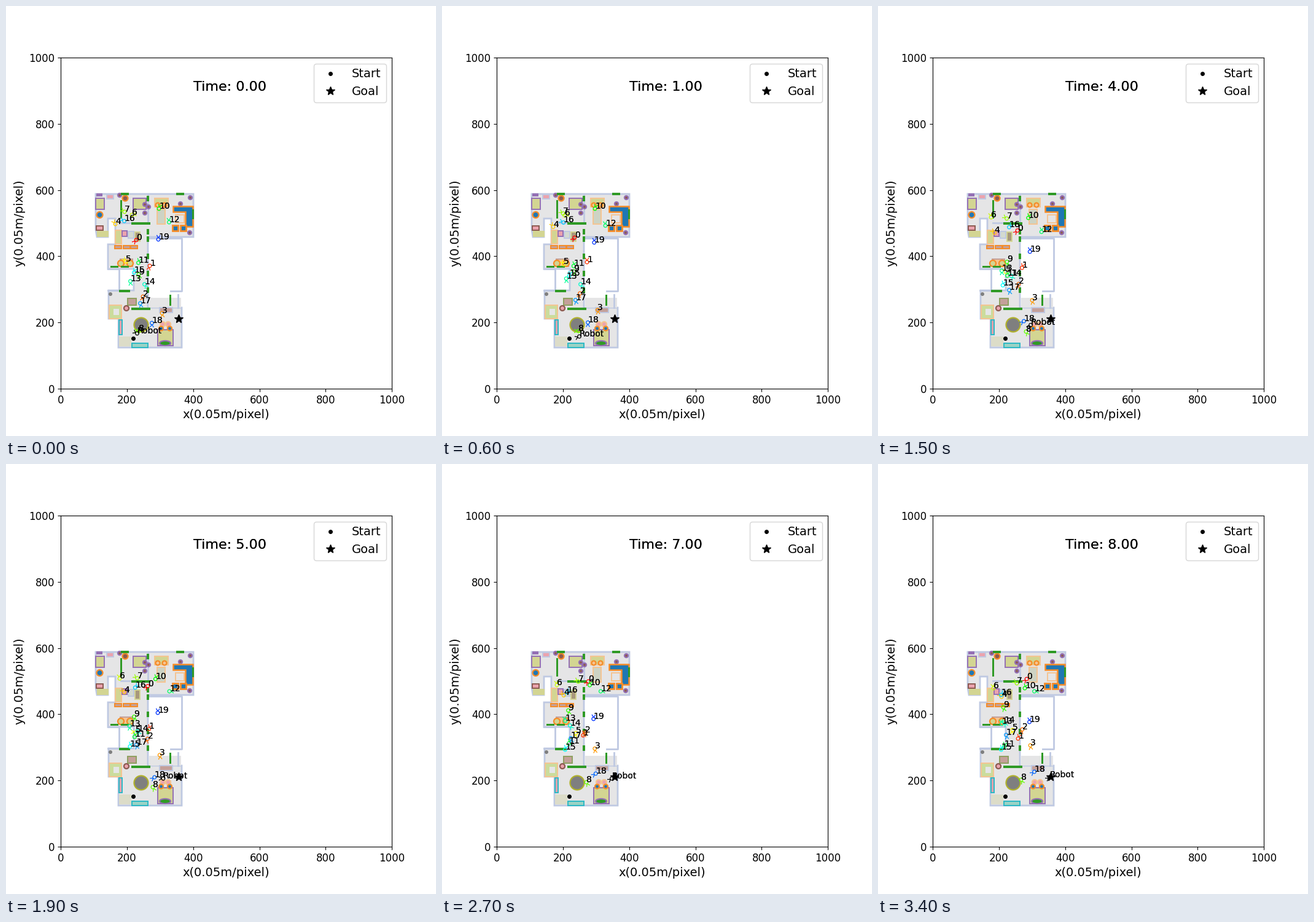
A matplotlib script for the animation above (3500 ms loop, 700 by 700 pixels).

```python
import colorsys
import numpy as np
import matplotlib.pyplot as plt
from matplotlib.animation import FuncAnimation
from matplotlib.patches import Circle, Ellipse, Polygon, Rectangle
from matplotlib.transforms import Affine2D

FRAMES = 35
LAST = 8  # simulated seconds
FLOOR, WALL = "#e5e5e6", "#bfc9e2"
GREEN, OLIVE, GRAY = "#2f9a25", "#d3d592", "#7f7f7f"
ORANGE, PEACH, BLUE, TEAL = "#f58c28", "#f5c491", "#1f77b4", "#2bb9c6"
PURPLE, BROWN, PINK, TAUPE = "#9470b4", "#8c5a50", "#eba3ae", "#c4a09a"

fig = plt.figure(figsize=(7, 7), dpi=100)
ax = fig.add_subplot()
ax.set(xlim=(0, 1000), ylim=(0, 1000))
ax.set_aspect("equal")
ax.tick_params(labelsize=12)
ax.set_xlabel("x(0.05m/pixel)", fontsize=14)
ax.set_ylabel("y(0.05m/pixel)", fontsize=14)

# Stage pixels (y down) to axes data
PX = Affine2D().translate(-89.25, -623).scale(1 / 0.539, -1 / 0.539) + ax.transData


def put(patch):
    patch.set_transform(PX)
    ax.add_artist(patch)
    return patch


def box(x, y, w, h, fill, edge="none", lw=1.4):
    """Rectangle around a centre."""
    put(Rectangle((x - w / 2, y - h / 2), w, h, fc=fill, ec=edge, lw=lw, zorder=1))


def blob(x, y, w, fill, edge="none", h=None):
    put(Ellipse((x, y), w, h or w, fc=fill, ec=edge, lw=1.6, zorder=1))


def wall(*points):
    ax.plot(*zip(*points), color=WALL, lw=2, transform=PX, zorder=1)


def doors(xs, ys, w, h):
    for x in xs:
        for y in ys:
            box(x, y, w, h, GREEN)


def draw_house():
    outline = [(146, 306), (305, 306), (305, 376), (231, 376), (231, 491),
               (286, 491), (286, 556), (183, 556), (183, 509), (167, 509),
               (167, 463), (208, 463), (208, 428), (166, 428), (166, 388),
               (178, 388), (178, 346), (166, 346), (166, 376), (148, 376),
               (146, 364)]
    put(Polygon(outline, fc=FLOOR, ec=WALL, lw=2, zorder=1))
    box(259, 483, 52, 16, FLOOR)
    wall((231, 378), (286, 378), (286, 464), (268, 464))
    wall((166, 428), (184, 428), (184, 463), (166, 463))
    wall((187, 353), (231, 353), (231, 306))
    wall((280, 470), (280, 491))


def draw_living():
    for x in (153, 217):
        box(x, 322, 14 + (x > 200) * 7, 18, OLIVE, PURPLE)
    blob(152.5, 340, 10, BLUE, ORANGE)
    box(152, 361, 11, 7, PINK, BROWN)
    box(157, 371, 19, 10, OLIVE)
    box(152, 307, 10, 5, PURPLE)
    box(169, 310, 11, 7, PINK, WALL)
    blob(194, 313, 9, BROWN, ORANGE)
    for x, y in [(185, 308), (226, 323), (232, 327), (226, 337), (300, 312),
                 (284, 322), (299, 369)]:
        blob(x, y, 6, BROWN, PURPLE)
    box(253, 320, 22, 14, OLIVE, PEACH)
    box(252, 343, 13, 24, "#cdd3c4", PEACH)
    for x in (247, 258):
        blob(x, 324, 7, PEACH, ORANGE)
    sofa = [(272, 326), (304, 326), (304, 359), (292, 359), (292, 335), (272, 335)]
    put(Polygon(sofa, fc=BLUE, ec=ORANGE, lw=1.8, zorder=1))
    box(283, 346, 14, 13, FLOOR, PEACH)
    for x in (275, 288):
        box(x, 361, 9, 9, BLUE, ORANGE, 2)


def draw_kitchen():
    box(183, 376, 10, 22, OLIVE, PEACH)
    box(193, 370, 8, 9, PINK, PURPLE)
    box(203, 372, 9, 11, "#d3dad0", WALL)
    box(214, 375, 8, 15, "#a8987c", OLIVE)
    for x in (182, 196, 208):
        box(x, 392, 11, 5, TAUPE, ORANGE)
    box(196, 418, 20, 12, PEACH, TAUPE)
    for x in (187, 202):
        blob(x, 419, 10, OLIVE, ORANGE)


def draw_bedroom():
    box(178, 498, 20, 22, "#cbdc9c", PEACH)
    box(179, 498, 9, 10, FLOOR)
    box(205, 481, 14, 11, TAUPE, "#8fa060")
    blob(196, 492, 8, PINK, BROWN)
    blob(170, 469, 6, GRAY)
    box(260, 495, 21, 8, TAUPE, WALL)
    box(186.5, 523, 5, 24, PINK, TEAL)
    box(218, 552, 26, 7, "#9ad2c4", TEAL)
    box(194, 546, 20, 16, "#dcdcc8")
    blob(220, 519, 23, GRAY, "#b0b12c")
    box(259.5, 540, 25, 26, OLIVE, PURPLE)
    for side in (-1, 1):
        blob(259.5 + 4.5 * side, 518, 8, PINK, PEACH)
        blob(259.5 + 7 * side, 525, 7, BLUE, ORANGE)
    blob(259, 549, 18, GREEN, PURPLE, h=8)


def draw_doors():
    doors((231,), (313, 367, 379, 407, 435, 462), 4, 9)
    doors((187.5,), (323, 338), 3, 15)
    doors((193, 283), (306,), 13, 4)
    doors((214, 224), (353.5, 493), 21, 4)
    doors((176, 193), (424,), 13, 3)
    doors((193,), (464,), 18, 4)
    doors((267.5,), (479,), 3, 18)
    doors((304.5,), (339,), 3, 16)


class Agent:
    """Ring, heading arrow and label that follow (t, x, y) key points."""

    def __init__(self, name, color, *keys):
        self.t, self.x, self.y = np.array(keys, float).T
        self.ring = put(Circle((0, 0), 2.8, fill=False, ec=color, lw=0.9, zorder=3))
        self.arrow, = ax.plot([], [], color=color, lw=0.9, transform=PX, zorder=3)
        self.label = ax.text(0, 0, name, fontsize=10, transform=PX, zorder=4)
        ax.add_artist(self.label)  # drawn twice for a heavier stroke

    def at(self, t):
        return np.array([np.interp(t, self.t, self.x), np.interp(t, self.t, self.y)])

    def move(self, t):
        a = min(t, LAST - 1)
        step = self.at(a + 1) - self.at(a)
        if not step.any():
            step = self.at(LAST) - self.at(0)
        d = step / np.hypot(*step)
        n = np.array([-d[1], d[0]])
        c = self.at(t)
        tip, tail = c - 2.5 * d, c - 6.5 * d
        self.ring.center = c
        self.arrow.set_data(*np.transpose([tail + 2.6 * n, tip, tail - 2.6 * n]))
        self.label.set_position(c)


draw_house()
draw_living()
draw_kitchen()
draw_bedroom()
draw_doors()

start, = ax.plot(218.5, 152, "ko", ms=4, ls="none", label="Start")
goal, = ax.plot(355.8, 210.6, "k*", ms=10, ls="none", label="Goal", zorder=3)
ax.legend(handles=[start, goal], loc="upper right", fontsize=14)

agents = []


def walk(x0, y0, x1, y1, *via):
    """Add the next person: start, end and optional turning points."""
    i = len(agents)
    color = colorsys.hsv_to_rgb(i / 30, 1, 1)
    agents.append(Agent(str(i), color, (0, x0, y0), *via, (LAST, x1, y1)))


walk(212, 381, 242, 350)
walk(234, 423, 228, 447, (1, 236, 417), (3, 236, 421))
walk(223, 473, 235, 432)
walk(254, 500, 248, 458)
walk(178, 355, 201, 379, (2, 184, 364))
walk(195, 416, 219, 433, (5, 211, 437), (7, 218, 438))
walk(205, 340, 188, 365, (4, 184, 344))
walk(193, 335, 226, 357)
walk(216, 529, 233, 514, (4, 241, 530))
walk(216, 437, 204, 396)
walk(249, 330, 239, 365, (1, 249, 330))
walk(215.5, 418, 205.5, 460)
walk(265.5, 352, 254.5, 370, (2, 266.5, 363), (5, 266, 370))
walk(202.5, 448, 201.5, 423, (7, 200.5, 418))
walk(225.5, 453, 205.5, 421, (1, 225.5, 453))
walk(208.5, 434, 200.5, 465, (6, 200.5, 465))
walk(192.5, 350, 200.5, 376, (4, 213.5, 360))
walk(218.5, 484, 208.5, 441)
walk(237.5, 516, 254.5, 501, (4, 237.5, 513))
walk(248, 380, 246.5, 420)
agents.append(Agent("Robot", "black", (0, 213.5, 533), (1, 223.5, 538), (2, 233.5, 534),
                    (5, 256, 512), (7, 276.5, 512), (LAST, 279.5, 510)))

clock = ax.text(400, 900, "", fontsize=16)
ax.add_artist(clock)


def update(i):
    t = (i + 1) // 4  # the simulation advances in whole seconds
    clock.set_text(f"Time: {t:.2f}")
    for agent in agents:
        agent.move(t)
    return []


anim = FuncAnimation(fig, update, frames=FRAMES, init_func=lambda: update(0),
                     interval=100, repeat=True, repeat_delay=0, blit=False)
plt.show()
```
